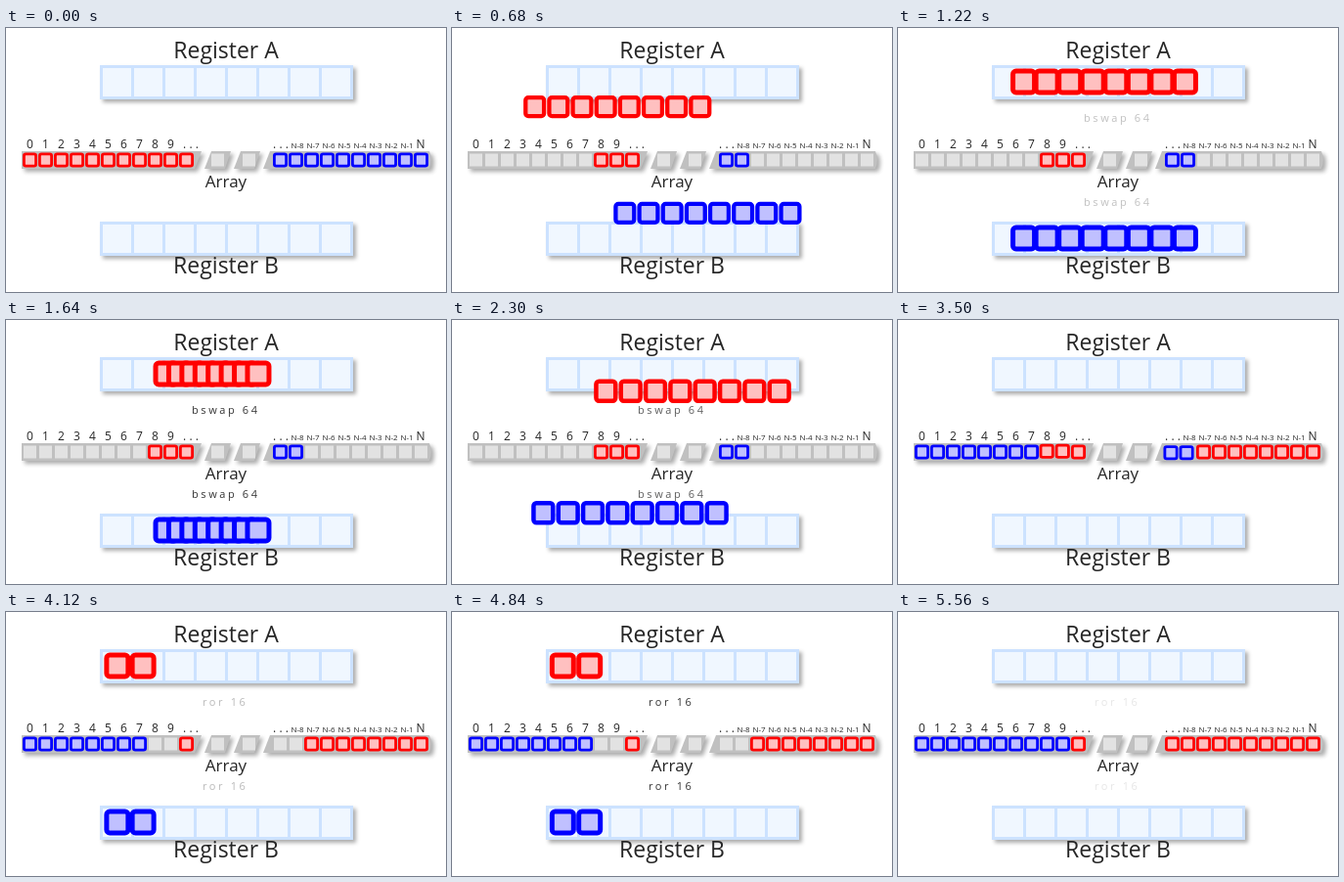
Recreate the animation shown at these times as an HTML page with a canvas. Size 450 by 270 pixels, loop 5700 ms.

```html
<!DOCTYPE html>
<html lang="en">
<head>
<meta charset="utf-8">
<title>Reversing an array with two registers</title>
<style>
  html, body { margin: 0; width: 100%; height: 100%; overflow: hidden; background: #fff; }
  canvas { display: block; width: 450px; height: 270px; }
</style>
</head>
<body>
<canvas id="stage"></canvas>
<script>
const W = 450, H = 270, LOOP = 5700, LAST_CHANGE = 5560, TICK = 20;
const FONT = '"Open Sans", "Noto Sans", sans-serif';
const RED = { line: '#ff0000', fill: '#ffc0c0' };
const BLUE = { line: '#0000ff', fill: '#c0c0ff' };

const CELL = 16, ARRAY_Y = 135, LEFT_X = 24.5, RIGHT_X = 280.5;
const SLOT = 28, SLOT_X = 113, ROW_A = 55, ROW_B = 215;

// lift: array to register, swap: reverse the bytes, drop: register to array
const stages = [
  {
    n: 8, lift: 500, swap: 1060, drop: 2200,
    label: { text: 'bswap 64', x: 190, start: 1040, end: 1620 },
    left: LEFT_X, right: RIGHT_X + 2 * CELL
  },
  {
    n: 2, lift: 3480, swap: 4020, drop: 5120,
    label: { text: 'ror 16', x: 201, start: 3920, end: 4500 },
    left: LEFT_X + 8 * CELL, right: RIGHT_X
  }
];
const MOVE = 300, SWAP = 880, FADE_OUT = 500;

const canvas = document.getElementById('stage');
const ctx = canvas.getContext('2d');
const dpr = window.devicePixelRatio || 1;
canvas.width = W * dpr;
canvas.height = H * dpr;
ctx.scale(dpr, dpr);

const lerp = (a, b, p) => a + (b - a) * p;
const ramp = (t, start, end) => Math.min(1, Math.max(0, (t - start) / (end - start)));
const quad = p => p < 0.5 ? 2 * p * p : 1 - 2 * (1 - p) ** 2;
const sine = p => (1 - Math.cos(Math.PI * p)) / 2;

function text(str, x, y, size, color = '#262626', align = 'center', spacing = 0) {
  ctx.font = `${size}px ${FONT}`;
  ctx.fillStyle = color;
  ctx.textAlign = align;
  ctx.letterSpacing = spacing + 'px';
  ctx.fillText(str, x, y);
}

function withShadow(draw) {
  ctx.save();
  ctx.shadowColor = 'rgba(0,0,0,0.33)';
  ctx.shadowBlur = 4 * dpr;
  ctx.shadowOffsetX = ctx.shadowOffsetY = 3 * dpr;
  draw();
  ctx.restore();
}

function register(y) {
  withShadow(() => {
    ctx.fillStyle = '#cce2ff';
    ctx.fillRect(96, y, 259, 35);
  });
  ctx.fillStyle = '#f0f7ff';
  for (let i = 0; i < 8; i++) ctx.fillRect(99 + i * 32, y + 3, 29, 29);
}

// Body piece between two top corners and two bottom corners
function piece(topL, topR, botR, botL) {
  ctx.beginPath();
  ctx.moveTo(topL, 126);
  ctx.lineTo(topR, 126);
  if (topR > 400) {
    ctx.quadraticCurveTo(topR + 4, 135, botR, 144);
  } else {
    ctx.lineTo(botR, 144);
  }
  ctx.lineTo(botL, 144);
  ctx.closePath();
  ctx.fill();
}

function arrayBody() {
  withShadow(() => {
    ctx.fillStyle = '#c0c0c0';
    piece(16, 200, 193, 16);
    piece(210, 230, 224, 203);
    piece(240, 260, 254, 233);
    piece(270, 433, 433, 263);
  });
  ctx.fillStyle = '#e2e2e2';
  for (let i = 0; i < 26; i++) {
    if (i === 11 || i === 13 || i === 15) continue;
    ctx.fillRect(LEFT_X + i * CELL - 6.5, ARRAY_Y - 6.5, 13, 13);
  }
}

function captions() {
  text('Register A', 225, 31, 23);
  text('Register B', 225, 251, 23);
  text('Array', 225, 163, 17);
  for (let i = 0; i < 10; i++) text(i, LEFT_X + i * CELL, 123, 12);
  text('. . .', 189, 123, 12);
  text('. . .', 281, 123, 12);
  for (let k = 8; k > 0; k--) text('N-' + k, 298 + (8 - k) * CELL, 123, 8);
  text('N', 424, 123, 12);
}

// p is 0 in the array and 1 in a register
function byte(x, y, p, color) {
  const size = lerp(15, 27, p), line = lerp(2.8, 5, p), side = size - line;
  ctx.beginPath();
  ctx.roundRect(x - side / 2, y - side / 2, side, side, lerp(1.8, 3.2, p));
  ctx.fillStyle = color.fill;
  ctx.fill();
  ctx.lineWidth = line;
  ctx.strokeStyle = color.line;
  ctx.stroke();
}

function group(stage, t, color, from, to, row) {
  const dropped = t >= stage.drop;
  const base = dropped ? to : from;
  const p = dropped
    ? 1 - quad(ramp(t, stage.drop, stage.drop + MOVE))
    : quad(ramp(t, stage.lift, stage.lift + MOVE));
  const s = sine(ramp(t, stage.swap, stage.swap + SWAP));
  for (let i = stage.n - 1; i >= 0; i--) {
    const slot = lerp(i, stage.n - 1 - i, s);
    const x = lerp(base + slot * CELL, SLOT_X + slot * SLOT, p);
    byte(x, lerp(ARRAY_Y, row, p), p, color);
  }
}

function stageLabel({ label, drop }, t) {
  const alpha = ramp(t, label.start, label.end) * (1 - ramp(t, drop, drop + FADE_OUT));
  if (alpha <= 0) return;
  ctx.globalAlpha = alpha;
  for (const y of [96, 182]) text(label.text, label.x, y, 11, '#333', 'left', 2.6);
  ctx.globalAlpha = 1;
}

function draw(t) {
  ctx.fillStyle = '#fff';
  ctx.fillRect(0, 0, W, H);
  register(38);
  register(198);
  arrayBody();
  captions();
  byte(LEFT_X + 10 * CELL, ARRAY_Y, 0, RED);
  for (const stage of stages) stageLabel(stage, t);
  for (const stage of stages) {
    group(stage, t, RED, stage.left, stage.right, ROW_A);
    group(stage, t, BLUE, stage.right, stage.left, ROW_B);
  }
}

const begin = performance.now();
function loop() {
  const t = (performance.now() - begin) % LOOP;
  draw(Math.min(Math.floor(t / TICK) * TICK, LAST_CHANGE));
  requestAnimationFrame(loop);
}
loop();
</script>
</body>
</html>
```
